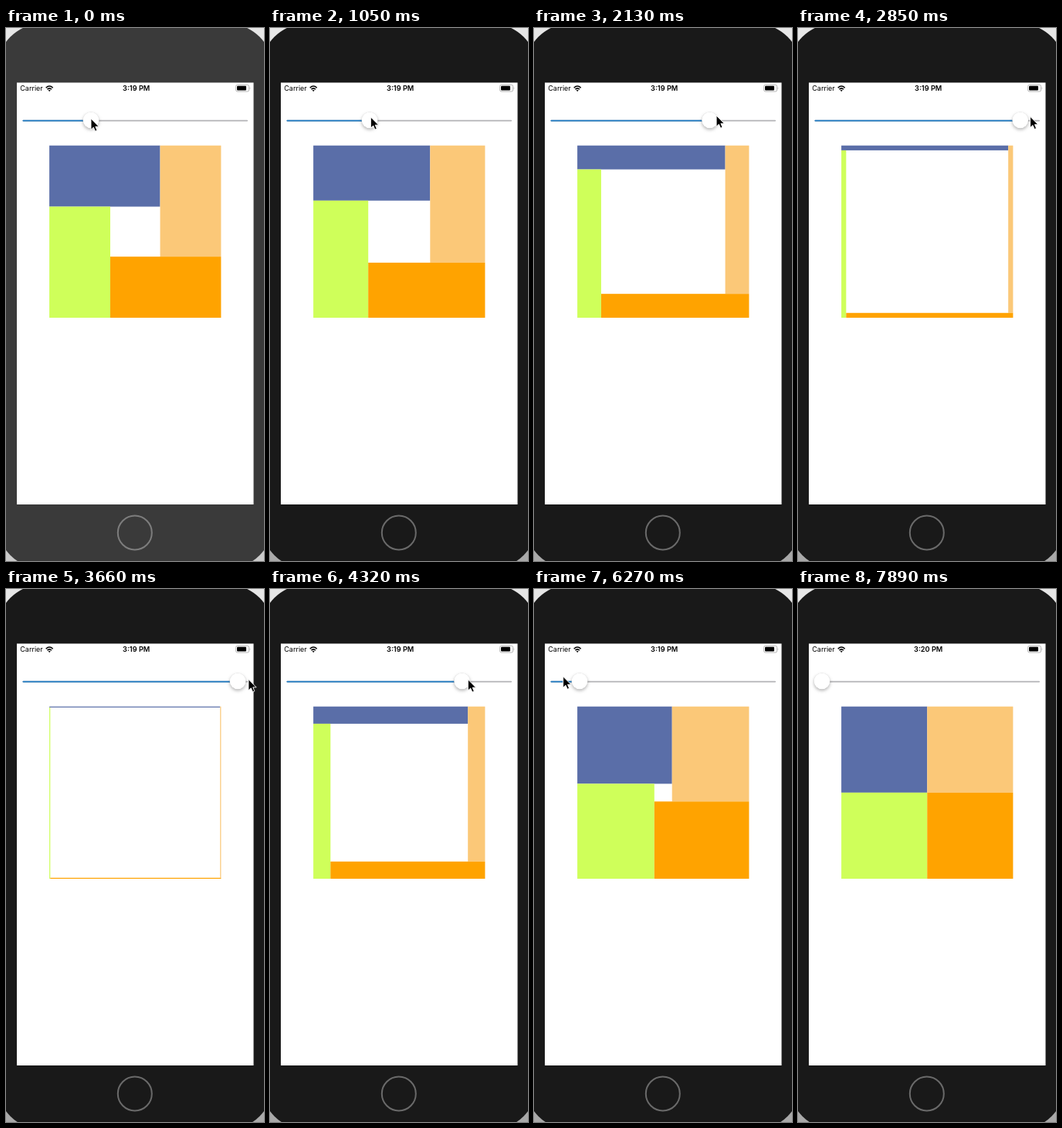
An HTML page for the animation above (9.42 s loop, 334x688 px).

```html
<!DOCTYPE html>
<html lang="en">
<head>
<meta charset="utf-8">
<title>Slider and tiles</title>
<style>
  html, body { margin: 0; width: 100%; height: 100%; overflow: hidden; background: #fff; }
  svg { display: block; width: 334px; height: 688px; font-family: Inter, Roboto, sans-serif; }
  #body { fill: #191919; }
  #home { fill: none; stroke: #6a6a6a; stroke-width: 2; }
  #shade { fill: #a9a9a9; }
  .inactive #body { fill: #3a3a3a; }
  .inactive #home { stroke: #7d7d7d; }
  .inactive #shade { fill: #cbcbcb; }
  #thumb { fill: #fff; filter: drop-shadow(0 2px 2px rgba(0, 0, 0, .25)) drop-shadow(0 0 .4px rgba(0, 0, 0, .2)); }
</style>
</head>
<body>
<svg id="stage" viewBox="0 0 334 688">
  <rect width="334" height="688" fill="#e6e6e6"/>
  <rect id="shade" y="640" width="334" height="48"/>
  <rect id="body" x="-12" y="-6" width="358" height="704" rx="60"/>
  <circle id="home" cx="166.8" cy="651.5" r="22"/>
  <rect x="14" y="70.5" width="306.5" height="544.5" fill="#fff"/>

  <text x="18.3" y="81.2" font-size="9">Carrier</text>
  <g fill="none" stroke="#000" stroke-width="1.6">
    <path d="M51.7 77.2Q56.2 72.8 60.7 77.2M53.5 79.2Q56.2 76.6 58.9 79.2"/>
    <path d="M56.2 82l-1.5-1.6q1.5-1.3 3 0z" fill="#000" stroke="none"/>
  </g>
  <text id="clock" x="168.7" y="81.3" font-size="9.2" font-weight="600" text-anchor="middle"></text>
  <rect x="297.6" y="73.4" width="17" height="8.6" rx="2" fill="none" stroke="#a4a4a4" stroke-width=".8"/>
  <rect x="299" y="74.8" width="12" height="5.8" rx="1" fill="#000"/>
  <path d="M315.7 76.2q1.5 1.5 0 3z" fill="#a4a4a4"/>

  <rect x="21.5" y="118.8" width="291.5" height="1.8" rx=".8" fill="#b3b3b6"/>
  <rect id="fill" x="21.5" y="118.8" height="1.8" rx=".8" fill="#1b78c2"/>
  <circle id="thumb" cy="118.9" r="10.4"/>

  <rect id="blue" fill="#5a6ea8"/>
  <rect id="peach" fill="#fbc878"/>
  <rect id="green" fill="#cfff5a"/>
  <rect id="orange" fill="#ffa300"/>

  <path id="cursor" d="M0 0V14.2L3.3 11.2L5.5 16.2L7.9 15.2L5.8 10.3H10.2Z" fill="#000" stroke="#fff" stroke-width=".9"/>
</svg>
<script>
const LOOP = 9420, STEP = 30;
const START = 110, MIN = 31, MAX = 303;
const LEFT = 56.1, TOP = 151.7, SIZE = 222.3;
const el = id => document.getElementById(id);

// One drag of the slider per entry; the pointer leads or trails the thumb
const drags = [
  { from: 630, to: 3210, thumb: MAX, pointer: 317 },
  { from: 3570, to: 3840, thumb: 292.5, pointer: 306 },
  { from: 4020, to: 4950, thumb: 129, pointer: 121 },
  { from: 4980, to: 5910, thumb: 70, pointer: 58 },
  { from: 6150, to: 6510, thumb: MIN, pointer: -14 }
];

// Pointer passes across the stage after the last drag
const flights = [
  { from: 7050, to: 7530, start: [0, 329], end: [213, 3] },
  { from: 7830, to: 7860, start: [244, -7], end: [303, -7] }
];

const mix = (a, b, u) => a + (b - a) * u;
const progress = (move, t) => Math.min(1, Math.max(0, (t - move.from) / (move.to - move.from)));
const ease = u => mix(u, u * u * (3 - 2 * u), .7);
const dragged = (part, t) => drags.reduce((x, d) => mix(x, d[part], ease(progress(d, t))), START);

function pointerAt(t) {
  const flight = flights.find(f => t >= f.from && t <= f.to);
  if (flight) return flight.start.map((a, i) => mix(a, flight.end[i], progress(flight, t)));
  return [dragged('pointer', t), 113 + 4 * Math.cos(t / 1300) ** 2];
}

function box(id, x, y, width, height) {
  const attrs = { x: LEFT + x, y: TOP + y, width, height };
  for (const name in attrs) el(id).setAttribute(name, attrs[name]);
}

function draw(t) {
  const x = dragged('thumb', t);
  const w = SIZE / 2 * (MAX - x) / (MAX - MIN), rest = SIZE - w;
  box('blue', 0, 0, rest, w);
  box('peach', rest, 0, w, rest);
  box('green', 0, w, w, rest);
  box('orange', w, rest, rest, w);
  el('thumb').setAttribute('cx', x);
  el('fill').setAttribute('width', x - 21.5);
  el('cursor').setAttribute('transform', `translate(${pointerAt(t)})`);
  el('clock').textContent = t < 7290 ? '3:19 PM' : '3:20 PM';
  el('stage').classList.toggle('inactive', t < 300);
}

function tick() {
  draw(Math.floor(performance.now() % LOOP / STEP) * STEP);
  requestAnimationFrame(tick);
}
tick();
</script>
</body>
</html>
```
